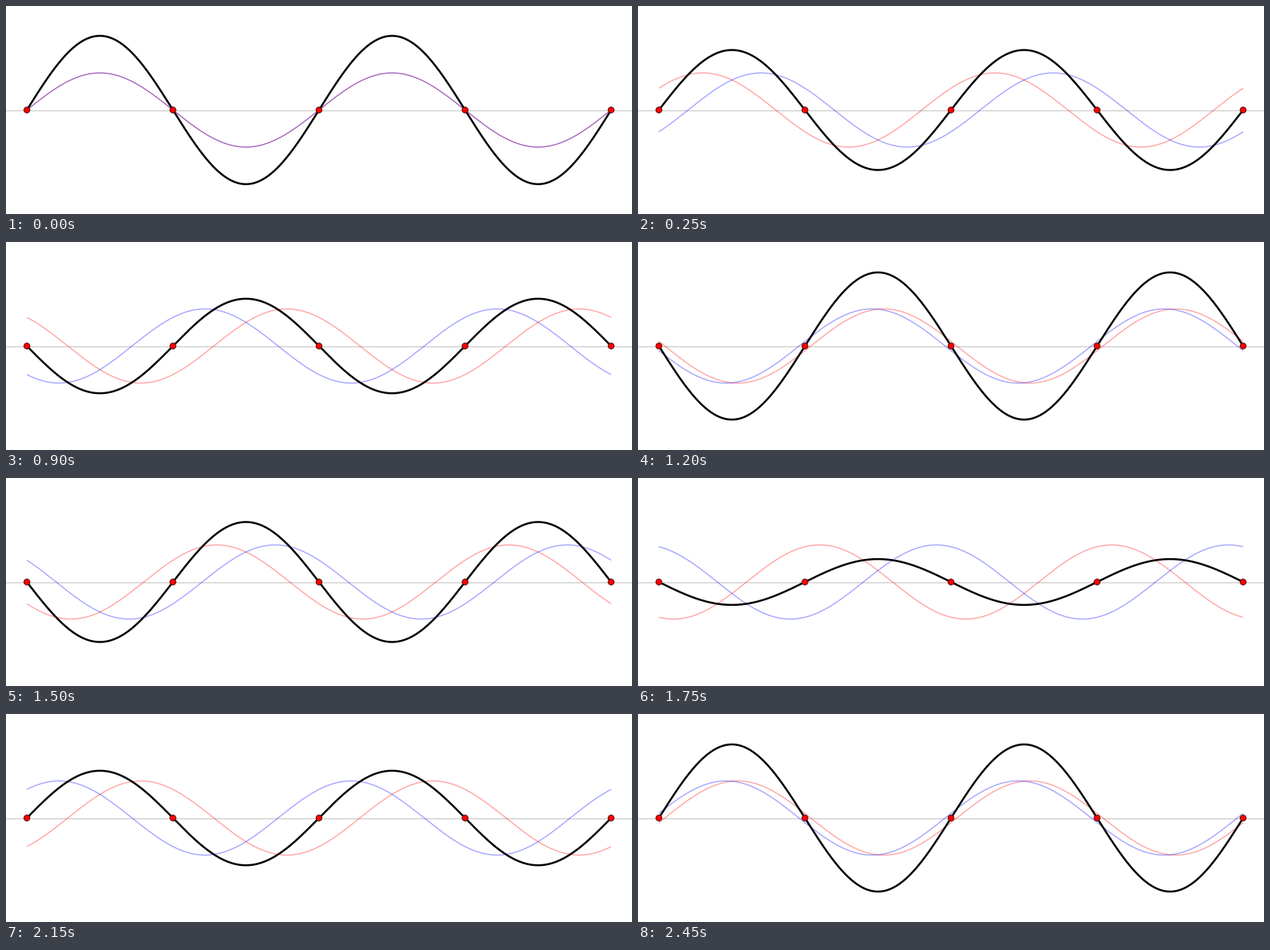
A matplotlib script for the animation above (2500 ms loop, 800 px wide and 267 px high).

```python
import numpy as np
import matplotlib.pyplot as plt
from matplotlib.animation import FuncAnimation
from matplotlib.patches import Circle

W, H = 800, 267
DPI = 64
PX = 72 / DPI  # points per pixel
FRAMES, INTERVAL = 50, 50

MID = H / 2
LEFT, RIGHT = W / 30, W * 29 / 30
WAVELENGTH = (RIGHT - LEFT) / 2
AMP = 47.6

fig = plt.figure(figsize=(W / DPI, H / DPI), dpi=DPI, facecolor="white")
ax = fig.add_axes([0, 0, 1, 1])
ax.set_xlim(0, W)
ax.set_ylim(H, 0)
ax.axis("off")

x = np.linspace(LEFT, RIGHT, 600)
angle = 2 * np.pi * (x - LEFT) / WAVELENGTH


def add_curve(color, width, alpha, z):
    line, = ax.plot(x, np.full_like(x, MID), color=color, lw=width * PX,
                    alpha=alpha, zorder=z, solid_capstyle="butt")
    return line


ax.plot([0, W], [MID, MID], color="#cccccc", lw=1.3 * PX, zorder=1)
leftward = add_curve("#ff0000", 1.35, 0.37, 2)
rightward = add_curve("#0000ff", 1.35, 0.37, 3)
total = add_curve("#000000", 2.5, 1, 4)

# Nodes of the standing wave
for node in np.linspace(LEFT, RIGHT, 5):
    ax.add_patch(Circle((node, MID), 3.8, facecolor="#ff0000",
                        edgecolor="#500000", lw=0.9 * PX, zorder=5))


def update(i):
    phase = 2 * np.pi * i / FRAMES
    a = AMP * np.sin(angle + phase)
    b = AMP * np.sin(angle - phase)
    leftward.set_ydata(MID - a)
    rightward.set_ydata(MID - b)
    total.set_ydata(MID - a - b)
    return leftward, rightward, total


anim = FuncAnimation(fig, update, frames=FRAMES, interval=INTERVAL,
                     repeat=True, repeat_delay=0, blit=False)
plt.show()
```
